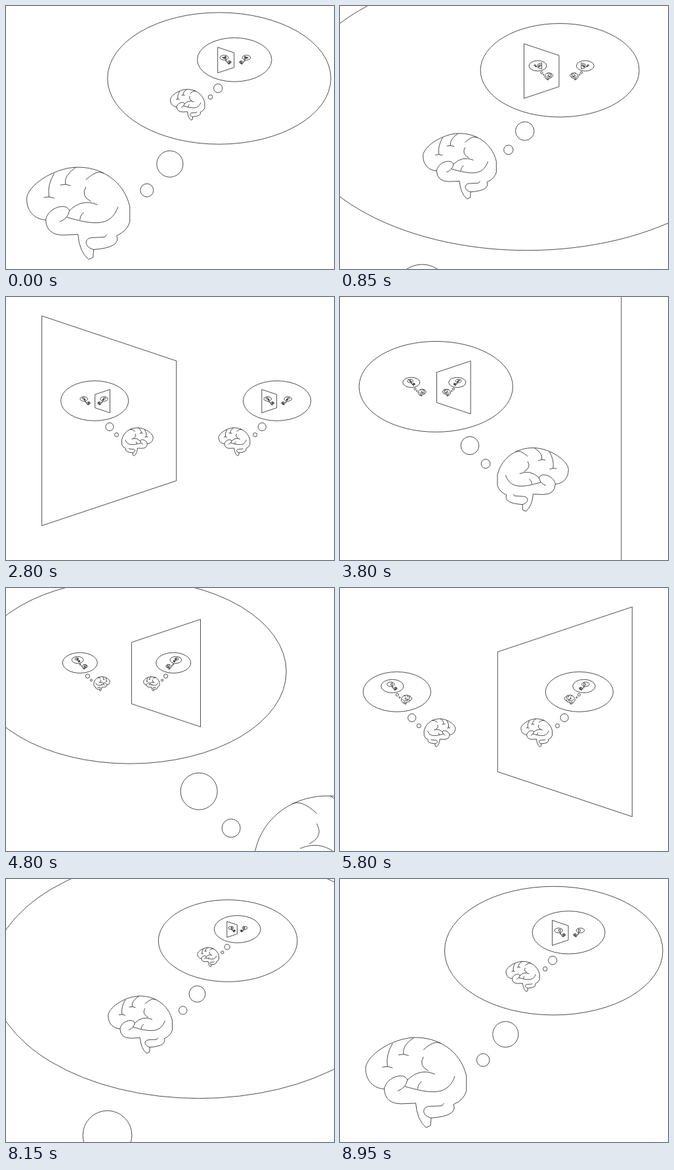
Write an HTML page that moves like this. It is 500x400 px and loops after 9 s.

```html
<!DOCTYPE html>
<html lang="en">
<head>
<meta charset="utf-8">
<title>Thinking about thinking</title>
<style>
  html, body { margin: 0; width: 100%; height: 100%; overflow: hidden; background: #fff; }
  svg { display: block; width: 100%; height: 100%; }
  path { fill: none; stroke: #000; stroke-width: .7; vector-effect: non-scaling-stroke; }
</style>
</head>
<body>
<svg viewBox="0 0 500 400">
  <defs>
    <path id="thought"/>
    <path id="mirror" d="M25 25L250 100V300L25 375Z"/>
  </defs>
  <g id="world"></g>
</svg>
<script>
const LEVEL_MS = 1500;
const ZOOM = 3;
const DEPTH = 6;
const FLIP = 'matrix(-1 0 0 1 500 0)';

// The kinds of scene, from the outside in; each is a third of the one around it.
const LEVELS = [
  { kind: 'thought' },
  { kind: 'thought' },
  { kind: 'mirror' },
  { kind: 'thought', flipped: true },
  { kind: 'mirror', flipped: true },
  { kind: 'thought' }
];

// The child scene's top left corner, which the camera zooms into.
const WINDOW = { thought: [240, 45], mirror: [55, 130] };
const REAL_X = 310;

const ellipse = (x, y, rx, ry = rx) =>
  `M${x - rx} ${y}a${rx} ${ry} 0 1 1 ${2 * rx} 0a${rx} ${ry} 0 1 1 ${-2 * rx} 0Z`;

// A groove bends down from the top edge and ends in a short crossbar.
const groove = (x, y, endX, endY) =>
  `M${x} ${y}Q${endX - 3} ${(y + endY) / 2} ${endX} ${endY}m-8 1l8 -1 8 2`;

function brain() {
  const cortex = 'M61 325C44 324 32 312 32 293S72 246 108 245S180 265 189 305V328Q185 342 169 349';
  const stem = 'M61 325Q62 348 88 348L110 347Q112 373 126 385L133 382 134 370';
  const cerebellum = 'M169 349Q176 367 134 370C118 366 120 352 132 352L151 351 154 347';
  const lobe = 'M61 325C64 306 93 298 97 311Q95 323 82 328';
  const folds = 'M149 254Q139 248 122 264M122 275Q114 289 130 297M97 311Q116 292 140 302' +
    'M93 321C132 332 160 337 171 305M119 314Q114 316 113 325';
  return cortex + stem + cerebellum + lobe + folds +
    groove(74, 254, 66, 290) + groove(107, 245, 91, 271);
}

document.getElementById('thought').setAttribute('d',
  brain() + ellipse(215, 280, 10) + ellipse(250, 240, 20) + ellipse(325, 110, 170, 100));

const place = (x, y, content, side = 1) =>
  `<g transform="matrix(${side / ZOOM} 0 0 ${1 / ZOOM} ${x} ${y})">${content}</g>`;

function scene(level, depth) {
  if (!depth) return '';
  const { kind } = LEVELS[level % LEVELS.length];
  const [x, y] = WINDOW[kind];
  const inner = scene(level + 1, depth - 1);
  const nested = kind === 'thought'
    ? place(x, y, inner)
    : place(REAL_X, y, inner) + place(x + 500 / ZOOM, y, inner, -1);
  return `<use href="#${kind}"/>` + nested;
}

const world = document.getElementById('world');
let shown = -1;

function render(time) {
  const pos = time / LEVEL_MS % LEVELS.length;
  const level = Math.floor(pos);
  const { kind, flipped } = LEVELS[level];
  if (level !== shown) {
    world.innerHTML = scene(level, DEPTH);
    shown = level;
  }
  const step = pos - level;
  const [x, y] = WINDOW[kind].map(v => -v * ZOOM * step);
  const scale = 1 + (ZOOM - 1) * step;
  world.setAttribute('transform',
    `${flipped ? FLIP : ''} translate(${x} ${y}) scale(${scale})`);
}

const start = performance.now();
function tick() {
  render(performance.now() - start);
  requestAnimationFrame(tick);
}
tick();
</script>
</body>
</html>
```
